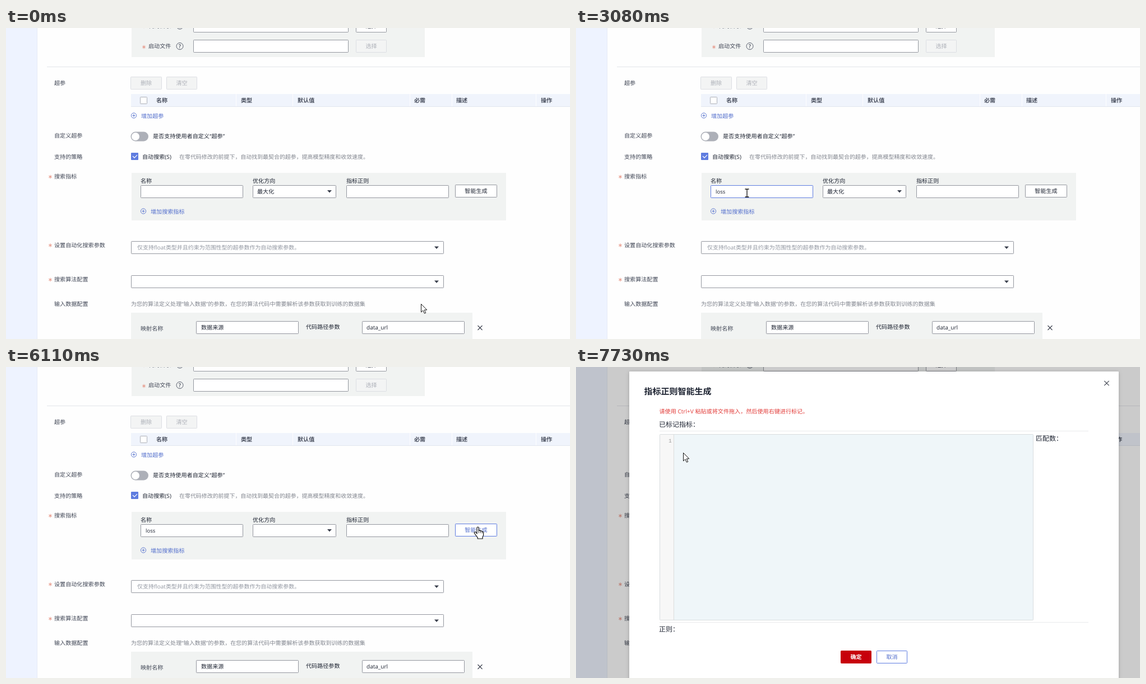
An HTML page for the animation above (8 s loop, 1006 by 556 pixels).

```html
<!DOCTYPE html>
<html lang="zh-CN">
<head>
<meta charset="utf-8">
<title>Form</title>
<style>
  html, body { margin: 0; width: 100%; height: 100%; overflow: hidden; background: #fefefe; }
  svg { display: block; width: 1006px; height: 556px; }
  text {
    font-family: "Open Sans", "Noto Sans CJK SC", "Noto Sans CJK", sans-serif;
    text-rendering: geometricPrecision; white-space: pre;
  }
</style>
</head>
<body>
<svg id="stage" viewBox="0 0 1006 556" xmlns="http://www.w3.org/2000/svg"></svg>
<script>
const LOOP = 8000;
const INK = '#1f2533', LABEL = '#414756', GREY = '#82868f', PALE = '#adb0b8';
const BLUE = '#5e7ce0', LINK = '#526ecc', PANEL = '#f1f3f2', EDGE = '#94979f';

// Text is placed by its vertical centre.
const text = (x, cy, s, fill = INK, o = {}) => {
  const size = o.size || 10.1;
  return `<text x="${x}" y="${cy + size * 0.38}" font-size="${size}" fill="${fill}"` +
    ` font-weight="${o.weight || 400}" text-anchor="${o.anchor || 'start'}"` +
    `${o.id ? ` id="${o.id}"` : ''}>${s}</text>`;
};
const fillBox = (x, y, w, h, fill, extra = '') =>
  `<rect x="${x}" y="${y}" width="${w}" height="${h}" fill="${fill}" ${extra}/>`;
const frame = (x, y, w, h, stroke = EDGE, fill = '#fff', id = '') =>
  fillBox(x + 0.5, y + 0.5, w - 1, h - 1, fill, `stroke="${stroke}" rx=".8" ${id && `id="${id}"`}`);
const field = (x, y, w, id) => frame(x, y, w, 23, EDGE, '#fff', id);
const path = (d, stroke, width = 1, extra = '') =>
  `<path d="${d}" fill="none" stroke="${stroke}" stroke-width="${width}" ${extra}/>`;
const button = (x, y, w, s, on) =>
  frame(x, y, w, 23, on ? EDGE : '#dcdee3', on ? '#fff' : '#f3f4f4') +
  text(x + w / 2, y + 11.5, s, on ? INK : PALE, { anchor: 'middle' });
const star = (x, y) => path(
  `M${x} ${y - 3.2}V${y + 3.2}M${x - 2.8} ${y - 1.6}L${x + 2.8} ${y + 1.6}M${x - 2.8} ${y + 1.6}L${x + 2.8} ${y - 1.6}`,
  '#e58a78', 0.9);
const help = (x, y) =>
  `<circle cx="${x}" cy="${y}" r="6" fill="none" stroke="#575d6c"/>` +
  text(x, y, '?', '#474d5c', { size: 9.5, anchor: 'middle', weight: 600 });
const addLink = (x, y, s) =>
  `<circle cx="${x}" cy="${y}" r="4.6" fill="none" stroke="${LINK}" stroke-width=".9"/>` +
  path(`M${x - 2.5} ${y}h5M${x} ${y - 2.5}v5`, LINK, 0.9) + text(x + 13, y + 0.5, s, LINK);
const down = (x, y, id = '') =>
  `<path d="M${x - 4} ${y - 2}h8l-4 4.5z" fill="#3a3f4c" ${id && `id="${id}"`}/>`;
const cross = (x, y, r) =>
  path(`M${x - r} ${y - r}l${2 * r} ${2 * r}M${x + r} ${y - r}l${-2 * r} ${2 * r}`, '#3a3f4c', 1.1);

function form() {
  const heads = [[268, '名称'], [419, '类型'], [520, '默认值'], [728, '必需'], [803, '描述'], [954, '操作']];
  const labels = [[98, '超参'], [192, '自定义超参'], [230, '支持的策略'], [265, '搜索指标'],
    [388, '设置自动化搜索参数'], [449, '搜索算法配置'], [493, '输入数据配置']];
  return [
    fillBox(0, 0, 1006, 556, '#fefefe'),
    fillBox(0, 0, 56, 556, '#eef3ff'), fillBox(55, 0, 1, 556, '#e6ebf6'),
    fillBox(224, 0, 523, 52, PANEL),
    star(246, -3), text(254, -4, '代码目录', LABEL), help(310, -4),
    field(334, -15, 277), button(624, -15, 55, '选择', true),
    star(246, 34), text(254, 32.5, '启动文件', LABEL), help(310, 32.5),
    field(334, 21, 277), button(624, 21, 55, '选择'),
    fillBox(73, 69, 933, 1, '#e3e5e9'),
    labels.map(([y, s]) => text(86, y, s, LABEL)).join(''),
    [266, 388.5, 450].map(y => star(79, y)).join(''),
    button(222, 87, 56, '删除'), button(286, 87, 55, '清空'),
    fillBox(223, 118, 783, 23, '#f0f4fc'), fillBox(223, 140, 783, 1, '#e2e6ef'),
    [410, 511, 720, 795, 945].map(x => fillBox(x, 118, 1, 22, '#fdfdff')).join(''),
    frame(239, 123, 13, 13, PALE),
    heads.map(([x, s]) => text(x, 129.5, s, '#474d5c', { weight: 700 })).join(''),
    addLink(228, 156.5, '增加超参'),
    fillBox(222.5, 185.5, 31.5, 17, PALE, 'rx="8.5"'),
    '<circle cx="231" cy="194" r="7" fill="#fff"/>',
    text(262, 193.5, '是否支持使用者自定义“超参”'),
    fillBox(223, 223, 13, 13, BLUE, 'rx="1"'), path('M226 229l3 3.2l5-5', '#fff', 1.2),
    text(243, 230, '自动搜索(S)'),
    text(309, 230, '在零代码修改的前提下，自动找到最契合的超参，提高模型精度和收敛速度。', GREY, { size: 9.95 }),
    fillBox(224, 259, 668, 85, PANEL),
    text(240, 273, '名称'), text(440, 273, '优化方向'), text(607, 273, '指标正则'),
    field(240, 281, 183, 'nameBox'),
    text(249, 292, '', INK, { size: 9.5, id: 'typed' }),
    fillBox(249, 286, 1, 12, '#111', 'id="caret"'),
    field(440, 281, 149, 'pickBox'),
    text(448, 292, '最大化', INK, { id: 'picked' }),
    down(577, 292, 'pickDown'), '<path id="pickUp" d="M573 294h8l-4 -4.5z" fill="#3a3f4c"/>',
    field(607, 281, 183),
    field(801, 280, 75, 'genBox'),
    text(838.5, 291.5, '智能生成', INK, { anchor: 'middle', id: 'genText' }),
    addLink(245, 327.5, '增加搜索指标'),
    field(223, 381, 558), down(768, 392.5),
    text(234, 392.5, '仅支持float类型并且约束为范围性型的超参数作为自动搜索参数。', '#9297a1', { size: 9.98 }),
    field(223, 442, 558), down(768, 453.5),
    text(223, 493, '为您的算法定义处理“输入数据”的参数，在您的算法代码中需要解析该参数获取到训练的数据集', GREY, { size: 10.02 }),
    fillBox(223, 509, 609, 47, PANEL),
    text(240, 537, '映射名称', LABEL), field(339, 524, 183), text(348, 535, '数据来源'),
    text(535, 534, '代码路径参数'), field(635, 524, 183), text(643, 535, 'data_url', INK, { size: 10 }),
    cross(845.5, 536, 4),
    '<g id="menu">', fillBox(440, 308, 149, 55, '#fff', 'filter="url(#soft)"'),
    fillBox(440, 310, 149, 25, BLUE), fillBox(440, 335, 149, 25, '#f2f5fc', 'id="hover"'),
    text(448, 322.5, '最大化', '#fff'), text(448, 347.5, '最小化'), '</g>'
  ].join('');
}

function dialog() {
  return '<g id="dialog">' + [
    fillBox(0, 0, 1006, 556, '#000', 'opacity=".2"'),
    fillBox(95, 8, 873, 560, '#fff', 'filter="url(#soft)" rx="1"'),
    text(121.5, 43, '指标正则智能生成', INK, { size: 15, weight: 700 }),
    cross(946.5, 29, 4.2),
    text(148.5, 79.5, '请使用 Ctrl+V 粘贴或将文件拖入，然后使用右键进行标记。', '#e23c39'),
    text(148, 102, '已标记指标：', INK, { size: 12 }),
    fillBox(149, 114, 765, 1, '#e9eaec'),
    frame(149, 120, 667, 333, '#d9dddf', '#eff6f9'),
    fillBox(150, 121, 24, 331, '#f7f7f7'), fillBox(174, 121, 1, 331, '#dddddd'),
    '<text x="165" y="135" font-size="9.5" fill="#999" style="font-family:\'Liberation Mono\',monospace">1</text>',
    text(820, 127, '匹配数：', INK, { size: 12 }),
    fillBox(149, 456, 765, 1, '#e9eaec'),
    text(148, 468.5, '正则：', INK, { size: 12 }),
    frame(472, 507, 55, 23, '#c7000b', '#c7000b', 'okBox'),
    text(499.5, 518.5, '确定', '#fff', { anchor: 'middle', weight: 700, id: 'okText' }),
    frame(536, 507, 55, 23, BLUE, '#fff', 'noBox'),
    text(563.5, 518.5, '取消', LINK, { anchor: 'middle', id: 'noText' })
  ].join('') + '</g>';
}

const CURSORS = `<g id="arrow"><path d="M.5 .5V15L3.9 11.9L6.4 17.3L8.7 16.3L6.3 11H10.8z" fill="#fff" stroke="#111"/></g>
<g id="beam"><path d="M-3.5 -7h2.5q1 0 1 1q0 -1 1 -1h2.5M0 -6V6M-3.5 7h2.5q1 0 1 -1q0 1 1 1h2.5" fill="none" stroke="#111" stroke-width="1.3"/></g>
<g id="hand"><path d="M-2 12V1.6Q-2 0 -.4 0Q1.3 0 1.3 1.6V6.8Q1.6 5.8 2.9 5.9Q4.3 6 4.4 7.6Q4.8 6.7 6 7Q7.2 7.3 7.3 8.7Q8 8.1 8.9 8.6Q9.7 9.1 9.6 10.5V14Q9.4 16.5 8 18V21H-.8V18.7Q-3 16.5 -4.4 14L-6.7 10.8Q-7.2 9.4 -5.9 9Q-4.6 8.7 -3.6 10z" fill="#fff" stroke="#111" stroke-width="1.2" stroke-linejoin="round"/><path d="M1.3 7v4M4.4 8v3M7.3 9v2.5" stroke="#111" fill="none" stroke-width=".8"/></g>`;

const stage = document.getElementById('stage');
stage.innerHTML = `<defs><filter id="soft" x="-10%" y="-20%" width="120%" height="140%">
<feDropShadow dx="0" dy="1" stdDeviation="3" flood-color="#000" flood-opacity=".2"/></filter></defs>` +
  form() + dialog() + CURSORS;
const el = {};
stage.querySelectorAll('[id]').forEach(n => { el[n.id] = n; });

// Pointer moves: first step, last step, step count, way points.
const MOVES = [
  [70, 510, 7, [[740, 493], [600, 420], [440, 340], [316, 287]]],
  [740, 900, 3, [[316, 287], [305, 295]]],
  [3150, 3380, 4, [[305, 295], [400, 297], [494, 295]]],
  [3700, 4090, 6, [[494, 295], [493, 312], [494, 337]]],
  [4330, 4400, 2, [[494, 337], [488, 346]]],
  [4640, 5340, 10, [[488, 346], [560, 342], [700, 318], [842, 286]]],
  [6570, 7190, 9, [[842, 286], [740, 301], [635, 300], [510, 277], [360, 228], [260, 194], [234, 189]]],
  [7420, 7730, 5, [[234, 189], [212, 172], [191, 153]]]
];
const KINDS = [[0, 'arrow'], [440, 'beam'], [3220, 'arrow'], [3380, 'hand'], [4700, 'arrow'], [5560, 'hand'], [6190, 'arrow']];
const TYPED = [[0, ''], [1840, 'l'], [2070, 'lo'], [2300, 'los'], [2530, 'loss']];
const CARET = [[0, 0], [980, 1], [1380, 0], [1840, 1], [3080, 0]];

const at = (list, t) => list.filter(k => k[0] <= t).pop();
const show = (n, v) => n.setAttribute('opacity', +v);
const paint = (n, stroke, fill) => {
  if (stroke) n.setAttribute('stroke', stroke);
  if (fill) n.setAttribute('fill', fill);
};

function pointer(t) {
  const move = at(MOVES, t);
  if (!move) return MOVES[0][3][0];
  const [a, b, n, pts] = move;
  const step = Math.min(n, Math.floor((t - a) / ((b - a) / (n - 1)) + 1e-6) + 1);
  const u = step / n * (pts.length - 1), i = Math.min(pts.length - 2, Math.floor(u));
  return [0, 1].map(k => Math.round(pts[i][k] + (pts[i + 1][k] - pts[i][k]) * (u - i)));
}

function draw(t) {
  const focused = t >= 980 && t < 3550, open = t >= 3550 && t < 4570, closed = t >= 4570;
  const [x, y] = pointer(t), kind = at(KINDS, t)[1];
  for (const k of ['arrow', 'beam', 'hand']) {
    show(el[k], k === kind);
    el[k].setAttribute('transform', `translate(${x} ${y})`);
  }
  const word = at(TYPED, t)[1];
  el.typed.textContent = word;
  el.caret.setAttribute('x', [249, 251, 258, 262, 266][word.length]);
  show(el.caret, at(CARET, t)[1]);
  paint(el.nameBox, focused ? BLUE : t >= 440 && t < 3220 ? '#575d6c' : EDGE);

  paint(el.pickBox, open ? BLUE : t >= 3380 && t < 4640 ? '#575d6c' : EDGE);
  show(el.picked, !closed);
  show(el.pickUp, open);
  show(el.pickDown, !open);
  show(el.menu, open ? (t < 3630 ? 0.5 : 1) : closed && t < 4640 ? 0.4 : 0);
  show(el.hover, t >= 4160);
  paint(el.genBox, t >= 5340 ? BLUE : EDGE);
  paint(el.genText, '', t >= 5410 ? LINK : INK);

  show(el.dialog, t >= 6190);
  const early = t < 6270, mid = t < 6340;
  paint(el.okBox, early ? '#cb4f56' : '#c7000b', early ? '#e06f73' : mid ? '#cf2a33' : '#c7000b');
  paint(el.okText, '', early ? '#bda3ab' : mid ? '#f0dcde' : '#fff');
  paint(el.noBox, early ? '#8e9dc9' : BLUE);
  paint(el.noText, '', early ? '#474d5c' : LINK);
}

const start = performance.now();
function tick(now) {
  draw(Math.max(0, now - start) % LOOP);
  requestAnimationFrame(tick);
}
draw(0);
requestAnimationFrame(tick);
</script>
</body>
</html>
```
